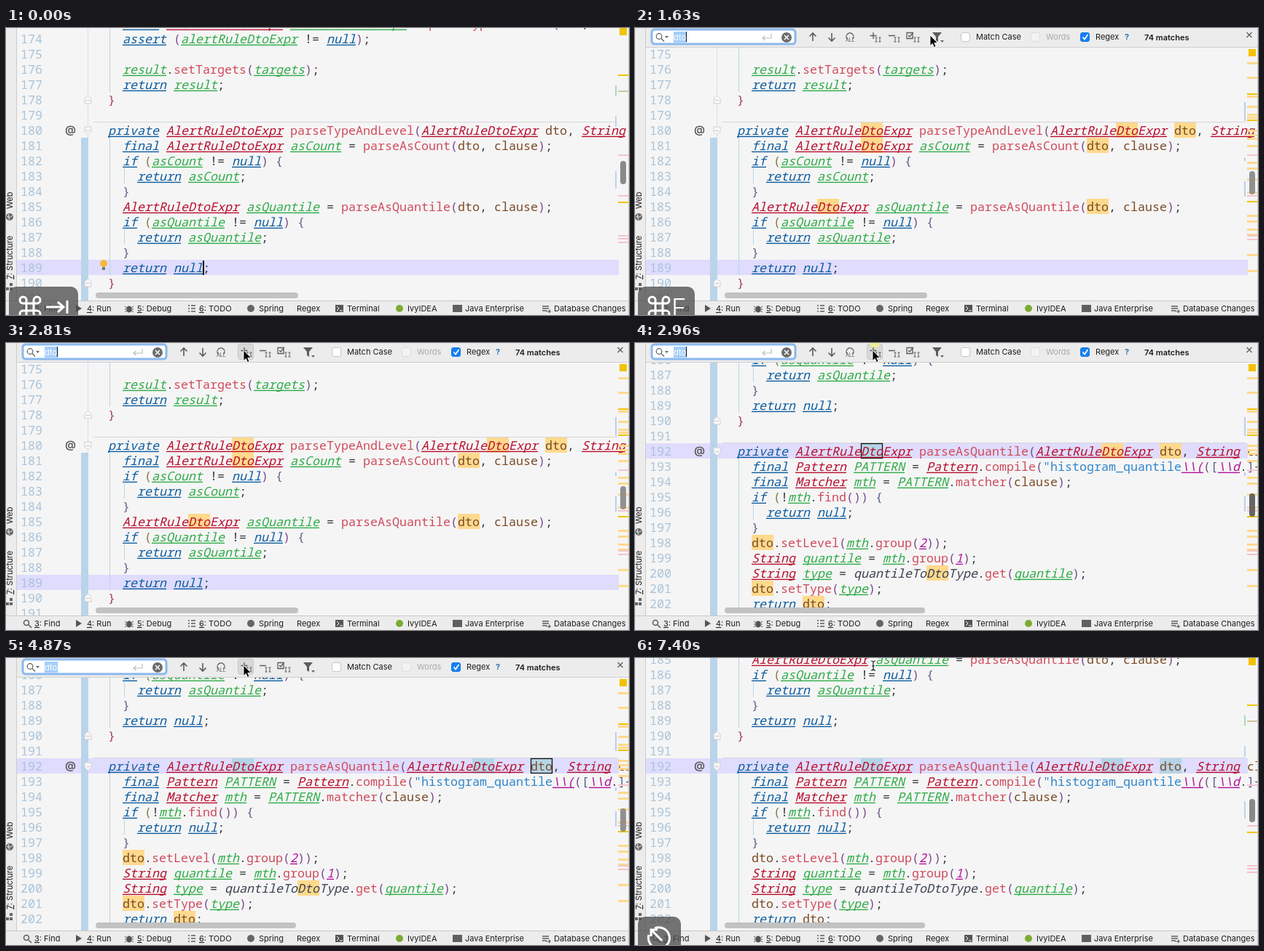
An HTML page that plays this animation: 855 px wide and 395 px high, repeating every 8000 ms.

```html
<!DOCTYPE html>
<html lang="en">
<head>
<meta charset="utf-8">
<title>Selecting occurrences</title>
<style>
html, body { margin: 0; width: 100%; height: 100%; overflow: hidden; background: #f5f5f5; }
svg { display: block; width: 855px; height: 395px; }
.code text { font: 300 16.667px "Noto Sans Mono", "DejaVu Sans Mono", monospace; fill: #35383d; }
.code .it { font-style: italic; }
.code .num { fill: #a9c3d9; }
.ui text { font: 11px Inter, "Open Sans", sans-serif; fill: #1c1c1c; }
.ui .off { fill: #a8a8a8; }
.icon { fill: none; stroke: #5c5c5c; stroke-width: 1.6; }
.key { fill: none; stroke: #fff; stroke-width: 3; }
.key text { stroke: none; fill: #fff; }
</style>
</head>
<body>
<svg viewBox="0 0 855 395" id="stage"></svg>
<script>
const source = {
  173: '    final AlertRuleDtoExpr alertRuleDtoExpr = parseTypeAndLevel(dto, clause);',
  174: '    assert (alertRuleDtoExpr != null);',
  176: '    result.setTargets(targets);',
  177: '    return result;',
  178: '  }',
  180: '  private AlertRuleDtoExpr parseTypeAndLevel(AlertRuleDtoExpr dto, String clause) {',
  181: '    final AlertRuleDtoExpr asCount = parseAsCount(dto, clause);',
  182: '    if (asCount != null) {',
  183: '      return asCount;',
  184: '    }',
  185: '    AlertRuleDtoExpr asQuantile = parseAsQuantile(dto, clause);',
  186: '    if (asQuantile != null) {',
  187: '      return asQuantile;',
  188: '    }',
  189: '    return null;',
  190: '  }',
  192: '  private AlertRuleDtoExpr parseAsQuantile(AlertRuleDtoExpr dto, String clause) {',
  193: '    final Pattern PATTERN = Pattern.compile("histogram_quantile\\\\(([\\\\d.]+',
  194: '    final Matcher mth = PATTERN.matcher(clause);',
  195: '    if (!mth.find()) {',
  196: '      return null;',
  197: '    }',
  198: '    dto.setLevel(mth.group(2));',
  199: '    String quantile = mth.group(1);',
  200: '    String type = quantileToDtoType.get(quantile);',
  201: '    dto.setType(type);',
  202: '    return dto;'
};
const words = s => new Set(s.split(' '));
const keywords = words('private final return if null assert');
const types = words('AlertRuleDtoExpr String Pattern Matcher');
const locals = words('result targets asCount asQuantile mth PATTERN quantile type alertRuleDtoExpr');
const params = words('dto clause');

// [colour, italic, underlined]
function styleOf(tok, next, col) {
  if (keywords.has(tok)) return ['#0d5c9f', 1, 1];
  if (types.has(tok)) return ['#b80f2e', 1, 1];
  if (locals.has(tok)) return ['#2fab48', 1, 1];
  if (params.has(tok)) return ['#7a4b28', 0, 0];
  if (/^(\\|\d)/.test(tok)) return ['#b0129a', 1, 1];
  if (tok[0] === '"') return ['#2f86cd', 0, 0];
  if (tok === 'quantileToDtoType') return ['#3c4250', 1, 0];
  if (/^\w/.test(tok) && next === '(') return ['#cf4b5c', 0, 0];
  if (tok === '}' && col === 2) return ['#a03a5c', 0, 0];
  if (/[()]/.test(tok)) return [col < 8 ? '#7f7a3c' : '#7b4a8e', 0, 0];
  if (/[{}[\]]/.test(tok)) return ['#5a5f8c', 0, 0];
  return ['#35383d', 0, 0];
}

const rect = (x, y, w, h, fill, more = '') =>
  `<rect x="${x}" y="${y}" width="${w}" height="${h}" fill="${fill}" ${more}/>`;
const text = (x, y, s, more = '') => `<text x="${x}" y="${y}" ${more}>${s.replace(/</g, '&lt;')}</text>`;
const path = (d, more = '') => `<path d="${d}" ${more}/>`;
const group = (id, body, more = '') => `<g id="${id}" ${more}>${body}</g>`;
const X = col => 120 + col * 10;

function codeLine(s, base) {
  let out = '';
  for (const m of s.matchAll(/\\\\.|"\w+|\w+|!=|[^\s]/g)) {
    const tok = m[0], col = m.index, [color, it, ul] = styleOf(tok, s[col + tok.length], col);
    if (ul) out += rect(X(col), base + 1.7, tok.length * 10, 1.4, color);
    out += text(X(col), base, tok, `style="fill:${color}" class="${it ? 'it' : ''}"`);
  }
  return out;
}

function view(id, first, last, anchor, base, barTop, scrollW) {
  const yOf = n => base + (n - anchor) * 21;
  let back = rect(15, yOf(anchor) - 17, 826, 21, '#dfdcfd') + rect(112, 0, 1, 375, '#dcdcee');
  let hits = '', lines = '';
  back += rect(103, barTop, 10, 375, '#bad4e9');
  for (const [a, b] of [[173, 177], [181, 189], [193, 202]])
    back += rect(142, yOf(a) - 17, 1, (b - a + 1) * 21, '#b9d4e6');
  for (const n of [183, 187, 196]) back += rect(162, yOf(n) - 17, 1, 21, '#b9d4e6');
  for (const n of [180, 192]) {
    back += rect(120, yOf(n) - 18, 719, 1, '#d6d6dc');
    lines += text(81, yOf(n) - 2, '@', 'style="font:600 15px Inter,sans-serif;fill:#555"');
  }
  for (const n of [178, 180, 190, 192]) {
    const up = n === 178 || n === 190, y = yOf(n) - 6;
    lines += path(up ? `M108 ${y + 5}v-7l4.500-4 4.500 4v7z` : `M108 ${y - 5}v7l4.500 4 4.500-4v-7z`,
      'fill="#f7f7f7" stroke="#d0d0d6"') + rect(110, y, 5, 1, '#c5c5cc');
  }
  for (let n = first; n <= last; n++) {
    const s = source[n] || '', y = yOf(n);
    lines += text(20, y, String(n), 'class="num"') + codeLine(s, y);
    for (const m of s.matchAll(/dto/gi)) hits += rect(X(m.index), y - 17, 30, 21, '#ffd98c');
  }
  let picks = '';
  if (id === 'late') [310, 640, 720].forEach((x, i) => {
    picks += rect(x, 138, 30, 21, '#b5d4e7', `id="pick${i}"`) +
      rect(x + .5, 138.5, 29, 20, 'none', `id="edge${i}" stroke="#111" stroke-width="1.3"`);
  });
  return group(id, back + group(id + 'Hits', hits) + picks + lines +
    rect(123, 364, scrollW, 8, '#c2c2c2', 'rx="4"'), 'class="code"');
}

function stripes() {
  const line = (ys, color, h = 2) => ys.map(y => rect(840, y, 14, h, color)).join('');
  const plain = rect(842, 0, 10, 10, '#f2c200') + line([64, 239], '#f2c200') + line([86], '#cfc3a0') +
    line([174, 230, 285, 289, 294], '#f6c3cb') + rect(836, 79, 2, 14, '#a9d8b8') +
    rect(836, 121, 2, 15, '#bcd6ee') + rect(836, 197, 2, 24, '#bcd6ee');
  const found = line([47, 67, 93, 107, 118, 122, 140, 146, 151, 161, 184, 192, 207, 225, 257, 265, 276, 283, 311, 333], '#ffd98c', 3) +
    line([90, 126, 238], '#f2c200') + line([174, 230, 285, 290], '#f6c3cb') +
    rect(842, 29, 10, 10, '#f2c200') + rect(836, 102, 2, 26, '#b9cdf0') + rect(836, 178, 2, 5, '#b9cdf0') + rect(836, 211, 2, 21, '#b9cdf0');
  return group('plain', plain) + group('found', found) + '<rect id="thumb" x="843" width="8" height="32" rx="4"/>';
}

function findBar() {
  const bars = x => path(`M${x} 13v6m-1.500-6h3m-3 6h3M${x + 5} 13v6m-1.500-6h3m-3 6h3`, 'class="icon" style="stroke-width:1"');
  const box = (x, fill, edge) => rect(x + .5, 6.5, 12, 12, fill, `rx="2.500" stroke="${edge}"`);
  return group('bar',
    rect(15, 0, 840, 26, '#ececec') + rect(15, 26, 840, 1, '#cfcfcf') +
    rect(23, 2, 197, 20, '#fff', 'rx="4" stroke="#8ab8ee" stroke-width="3"') +
    '<circle cx="33" cy="11.500" r="3.800" class="icon" style="stroke-width:1.200"/>' +
    path('M36 14.500l4 4', 'class="icon" style="stroke-width:1.300"') + path('M41 11h5l-2.500 3z', 'fill="#666"') +
    rect(53, 5, 18, 15, '#a5cdfb') + text(53, 16.5, 'dto', 'style="fill:#fff"') +
    rect(70, 5, 1, 14, '#111', 'id="fieldCaret"') +
    path('M187 8v6h-12m3.500-3l-3.500 3 3.500 3', 'class="icon" style="stroke:#bbb;stroke-width:1.200"') +
    '<circle cx="208" cy="13" r="7" fill="#6c6c6c"/>' + path('M205 10l6 6m0-6l-6 6', 'stroke="#fff" stroke-width="1.500"') +
    '<rect id="hover" y="1.500" width="21" height="21" rx="3" fill="#d9d9d9" stroke="#c6c6c6"/>' +
    '<ellipse id="click" cx="329" cy="1" rx="7" ry="6" fill="#f4f08a" opacity=".8"/>' +
    path('M244 18v-11m-4.500 4.500l4.500-4.500 4.500 4.500M270 7v11m-4.500-4.500l4.500 4.500 4.500-4.500', 'class="icon"') +
    path('M291 15a5 5 0 1 1 8 0', 'class="icon" style="stroke-width:1.300"') +
    text(289, 19, 'ALL', 'style="font-size:7px;fill:#555"') +
    path('M327 6v9m-4.500-4.500h9M348 10.500h9M373 6.500h8v8h-8zM375 10l2 2 5-6', 'class="icon" style="stroke-width:1.300"') +
    bars(331) + bars(357) + bars(384) +
    path('M408 6h13l-5 6v7l-3-2v-5z', 'fill="#5c5c5c"') + path('M419 17h5l-2.500 3z', 'fill="#666"') +
    box(447, '#fff', '#c6c6c6') + text(468, 16, 'Match Case') +
    box(543, '#f3f3f3', '#ddd') + text(564, 16, 'Words', 'class="off"') +
    box(611, '#1580f5', '#1474e0') + path('M614.500 12.500l2.500 3 4.500-6.500', 'fill="none" stroke="#fff" stroke-width="1.700"') +
    text(632, 16, 'Regex') + text(672, 16, '?', 'style="fill:#2f75b5;font-weight:700"') +
    text(699, 17, '74 matches', 'style="font-weight:600"') +
    path('M839.500 6l7 7m0-7l-7 7', 'class="icon" style="stroke-width:1.300"'), 'class="ui"');
}

function chrome() {
  const tabs = [[39, '3: Find'], [111, '4: Run'], [180, '5: Debug'], [265, '6: TODO'], [347, 'Spring'], [399, 'Regex'],
    [468, 'Terminal'], [551, 'IvyIDEA'], [630, 'Java Enterprise'], [752, 'Database Changes']];
  const label = s => /^\d:/.test(s) ? `<tspan text-decoration="underline">${s[0]}</tspan>${s.slice(1)}` : s;
  const raw = ([x, s]) => `<text x="${x}" y="390">${label(s)}</text>`;
  return `<g class="ui">` + rect(0, 0, 14, 395, '#ececec') + rect(14, 0, 1, 375, '#cbcbcb') +
    rect(0, 375, 855, 20, '#ececec') + rect(0, 375, 855, 1, '#c8c8c8') + rect(854, 0, 1, 395, '#d2d2d2') +
    tabs.map(raw).join('') +
    '<text transform="translate(9 249) rotate(-90)">Web</text>' +
    `<text transform="translate(9 346) rotate(-90)">${label('7: Structure')}</text>` +
    '<circle cx="5" cy="260" r="5" fill="#686868"/>' + path('M1 259q4 3 8-1M4 256q-2 4 1 8', 'fill="none" stroke="#ececec"') +
    rect(0, 357, 4, 4, '#666') + rect(5, 357, 4, 4, '#666') + rect(5, 351, 4, 4, '#666') +
    '<circle cx="28" cy="385" r="3.500" class="icon"/>' + path('M31 388l4 4', 'class="icon"') +
    path('M96 381l8 5-8 5z', 'fill="#555"') +
    '<ellipse cx="169" cy="387" rx="3.500" ry="4.500" fill="#555"/>' +
    path('M163 383l12 8m0-8l-12 8M163 387h12', 'stroke="#555"') +
    path('M250 382h2m2 0h6M250 386h2m2 0h6M250 390h2m2 0h6', 'class="icon"') +
    '<circle cx="336" cy="386" r="5" fill="#666"/><circle cx="540" cy="386" r="5" fill="#7cab34"/>' +
    rect(452, 381, 11, 10, '#555') + path('M454 383l3 3-3 3m4 0h4', 'fill="none" stroke="#fff"') +
    rect(613, 381, 13, 10, '#606060') +
    path('M736 383h9m-9 3h9m-9 3h6', 'class="icon"') + path('M741 390h6m-2-2l2 2-2 2', 'class="icon" style="stroke-width:1.200"') + '</g>';
}

function keys() {
  const plate = w => rect(4, 356, w, 50, '#4b4b4b', 'rx="10" opacity=".76" stroke="none"');
  const cmd = path('M28 379h10v10h-10zM28 379h-4.500a4.500 4.500 0 1 1 4.500-4.500zM38 379v-4.500a4.500 4.500 0 1 1 4.500 4.500zM38 389h4.500a4.500 4.500 0 1 1-4.500 4.500zM28 389v4.500a4.500 4.500 0 1 1-4.500-4.500z');
  return group('keyTab', plate(95) + cmd + path('M55 384h24m-8-7l8 7-8 7M84 375v18'), 'class="key"') +
    group('keyFind', plate(78) + cmd + text(50, 398, 'F', 'style="font:300 35px Inter,sans-serif"'), 'class="key"') +
    group('keyEsc', plate(59) + path('M27 372a14.500 14.500 0 1 1-8 9M37 389l-15-15m0 9v-9h9'), 'class="key"');
}

const $ = id => document.getElementById(id);
$('stage').innerHTML = rect(0, 0, 855, 395, '#f5f5f5') +
  view('early', 173, 191, 189, 336, 151, 278) + view('late', 185, 202, 192, 155, 0, 275) +
  group('bulb', '<circle cx="134" cy="324" r="5" fill="#f5b83d"/>' + rect(132, 329, 4, 4, '#777')) +
  rect(270, 320, 2, 20, '#000', 'id="caret"') +
  group('carets', [339, 669, 749].map(x => rect(x, 138, 2, 21, '#000')).join('')) +
  stripes() + findBar() + chrome() + keys() +
  path('M0 0v14.500l3.300-3 2.200 5 2.500-1-2.200-5h4.700z', 'id="mouse" fill="#000" stroke="#fff" stroke-width=".9"') +
  path('M324 4q3 0 3 2v9q0 2-3 2m6-13q-3 0-3 2v9q0 2 3 2m-5-6h4', 'id="beam" fill="none" stroke="#222" stroke-width="1.200"');

// Each track holds [start, value...] steps
const tracks = {
  key: [[0, 'keyTab', 1], [150, 'keyFind', 1], [2360, 'keyFind', .65], [2510, 'keyFind', .25], [2660, '', 0], [6360, 'keyEsc', 1]],
  mouse: [[0, -50, 0], [590, 491, -1], [1480, 468, 4], [1630, 405, 10], [1780, 335, 13], [1930, 284, 13],
    [2060, 271, 11], [2210, 290, 10], [2360, 312, 10], [2510, 326, 10]],
  hover: [[0, -50], [1780, 318.5], [1930, -50], [2060, 259.5], [2360, -50], [2660, 318.5]],
  thumb: [[0, 183, '#898989'], [300, 197, '#666'], [1040, 197, '#7b7b7b'], [1190, 197, '#919191'], [2960, 207, '#666'],
    [3400, 207, '#7b7b7b'], [3540, 207, '#919191'], [6500, 194, '#666'], [7100, 194, '#898989']],
  field: [[0, 1], [1190, 0], [1630, 1], [2210, 0], [2810, 1], [3400, 0], [3980, 1], [4570, 0], [5020, 1], [5460, 0], [6060, 1]],
  picked: [[0, 0], [2960, 1], [3830, 2], [4870, 3]]
};
const at = (name, t) => tracks[name].filter(s => s[0] <= t).pop().slice(1);
const show = (id, on) => { $(id).style.display = on ? '' : 'none'; };

function draw(t) {
  const open = t >= 300 && t < 6500, late = t >= 2960, matched = t >= 440 && t < 6500;
  show('early', !late);
  show('late', late);
  show('earlyHits', matched);
  show('lateHits', matched);
  show('found', matched);
  show('plain', !matched);
  show('bar', open);
  show('bulb', t < 300);
  show('caret', t < 300);
  show('carets', t >= 6500 && t < 7400);
  show('fieldCaret', at('field', t)[0]);
  show('click', t >= 2960 && t < 3100);
  show('beam', t >= 6500);
  show('mouse', t < 6500);

  const [picked] = at('picked', t);
  for (let i = 0; i < 3; i++) {
    show('pick' + i, i < picked);
    show('edge' + i, i === picked - 1 && t < 6500);
  }
  const [key, alpha] = at('key', t);
  for (const id of ['keyTab', 'keyFind', 'keyEsc']) {
    show(id, id === key);
    $(id).setAttribute('opacity', alpha);
  }
  const [mx, my] = at('mouse', t);
  $('mouse').setAttribute('transform', `translate(${mx} ${my})`);
  $('hover').setAttribute('x', at('hover', t)[0]);
  const [y, fill] = at('thumb', t);
  $('thumb').setAttribute('y', y);
  $('thumb').setAttribute('fill', fill);
}

const start = performance.now();
function tick(now) {
  draw(Math.max(0, now - start) % 8000);
  requestAnimationFrame(tick);
}
draw(0);
requestAnimationFrame(tick);
</script>
</body>
</html>
```
